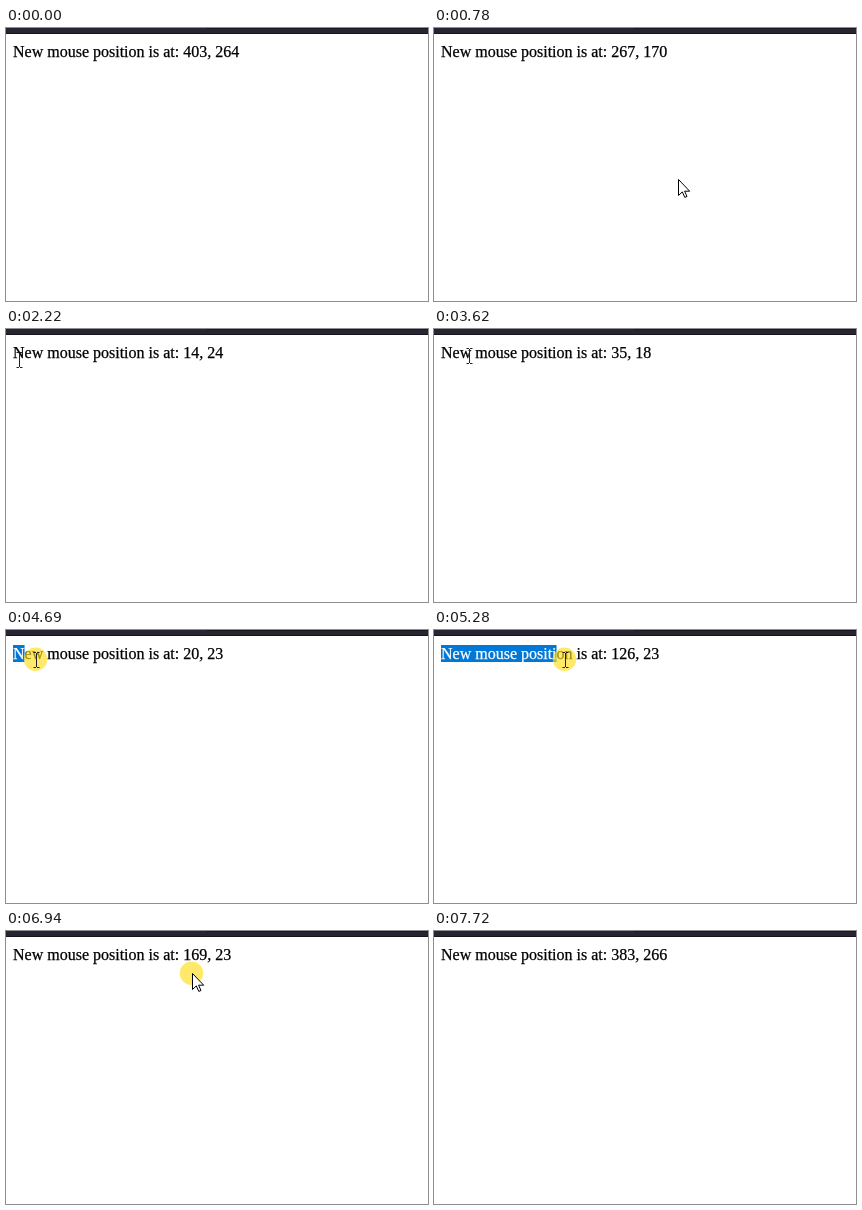
An HTML page that plays this animation: 422x273 px, repeating every 8.06 s.

```html
<!DOCTYPE html>
<html lang="en">
<head>
<meta charset="utf-8">
<title>Mouse position</title>
<style>
  html, body { margin: 0; width: 100%; height: 100%; overflow: hidden; background: #fff; }
  svg { display: block; }
  text { font: 16px "Liberation Serif", "Times New Roman", serif; white-space: pre; stroke: #000; stroke-width: .25px; }
  #picked { fill: #fff; stroke: #fff; }
</style>
</head>
<body>
<svg width="422" height="273" viewBox="0 0 422 273">
  <rect width="422" height="6" fill="#17141c"/>
  <rect width="422" height="5" fill="#292432"/>
  <rect x="200" width="222" height="1" fill="#1b1821"/>
  <rect id="mark" x="7" y="15" height="17" fill="#0078d7"/>
  <text id="label" x="7" y="29"><tspan id="picked"></tspan><tspan id="rest"></tspan></text>
  <circle id="press" r="11.7" fill="#ffdd1a" fill-opacity=".65"/>
  <path id="arrow" d="M.5.5V16.5L4.3 12.9 6.8 18.4 9 17.5 6.6 12.2H11.7Z" fill="#fff" stroke="#000"/>
  <path id="beam" d="M-3-7.5H-.5M.5-7.5H3M0-7V7M-3 7.5H-.5M.5 7.5H3" fill="none" stroke="#222"/>
</svg>
<script>
const LOOP = 8060, STEP = 65, START = [403, 264];
const $ = id => document.getElementById(id);

// Each stroke: begin, end, then the Bézier points that follow the last position.
const strokes = [
  [520, 1300, [225, 185], [190, 35], [153, 41]],
  [1300, 2220, [118, 36], [80, 92], [14, 24]],
  [2220, 2360, [14, 24], [9, 25]],
  [2630, 3300, [20, 0], [45, 8], [35, 18]],
  [3620, 4030, [37, 22], [30, 22], [11, 23]],
  [4560, 5280, [11, 23], [112, 23], [126, 23]],
  [5280, 5870, [148, 23], [167, 23]],
  [6540, 6730, [169, 23]],
  [6890, 7720, [275, 105], [383, 266]]
];

const mix = (a, b, u) => a.map((v, i) => v + (b[i] - v) * u);

function bezier(points, u) {
  while (points.length > 1) points = points.slice(1).map((p, i) => mix(points[i], p, u));
  return points[0];
}

function pointerAt(t) {
  const i = strokes.findLastIndex(s => s[0] <= t);
  if (i < 0) return START;
  const [begin, end, ...points] = strokes[i];
  const from = i ? strokes[i - 1].at(-1) : START;
  return bezier([from, ...points], Math.min(1, (t - begin) / (end - begin))).map(Math.round);
}

// Holds time at the latest screen update.
function snap(t) {
  const stroke = strokes.findLast(s => s[0] <= t);
  if (!stroke) return 0;
  const [begin, end] = stroke;
  const count = Math.round((end - begin) / STEP), step = (end - begin) / count;
  return begin + Math.min(count, Math.floor((t - begin) / step + 1e-6)) * step;
}

function show(id, visible, x, y) {
  $(id).setAttribute("visibility", visible ? "visible" : "hidden");
  $(id).setAttribute("transform", `translate(${x} ${y})`);
}

function write(words, count) {
  $("picked").textContent = words.slice(0, count);
  $("rest").textContent = words.slice(count);
}

function draw(t) {
  const now = snap(t);
  const [x, y] = pointerAt(now);
  const [cx, cy] = pointerAt(now + STEP);   // the readout trails the pointer
  const words = `New mouse position is at: ${x}, ${y}`;

  write(words, 0);
  const edge = n => n ? $("label").getSubStringLength(0, n) : 0;
  let count = 0;
  if (t >= 4560 && t < 6890) {
    while ((edge(count) + edge(count + 1)) / 2 < x - 8) count++;
  }
  $("mark").setAttribute("width", edge(count));
  write(words, count);

  const inside = cy < 256, overText = cy < 27 && cx < 226;
  const pressed = t >= 4560 && t < 6730 || t >= 6890 && t < 6890 + 2 * STEP;
  show("press", pressed, cx - 0.5, cy + 6.3);
  show("arrow", inside && !overText, cx, cy + 6);
  show("beam", inside && overText, cx + 0.5, cy + 7);
}

function tick() {
  draw(performance.now() % LOOP);
  requestAnimationFrame(tick);
}
tick();
</script>
</body>
</html>
```
